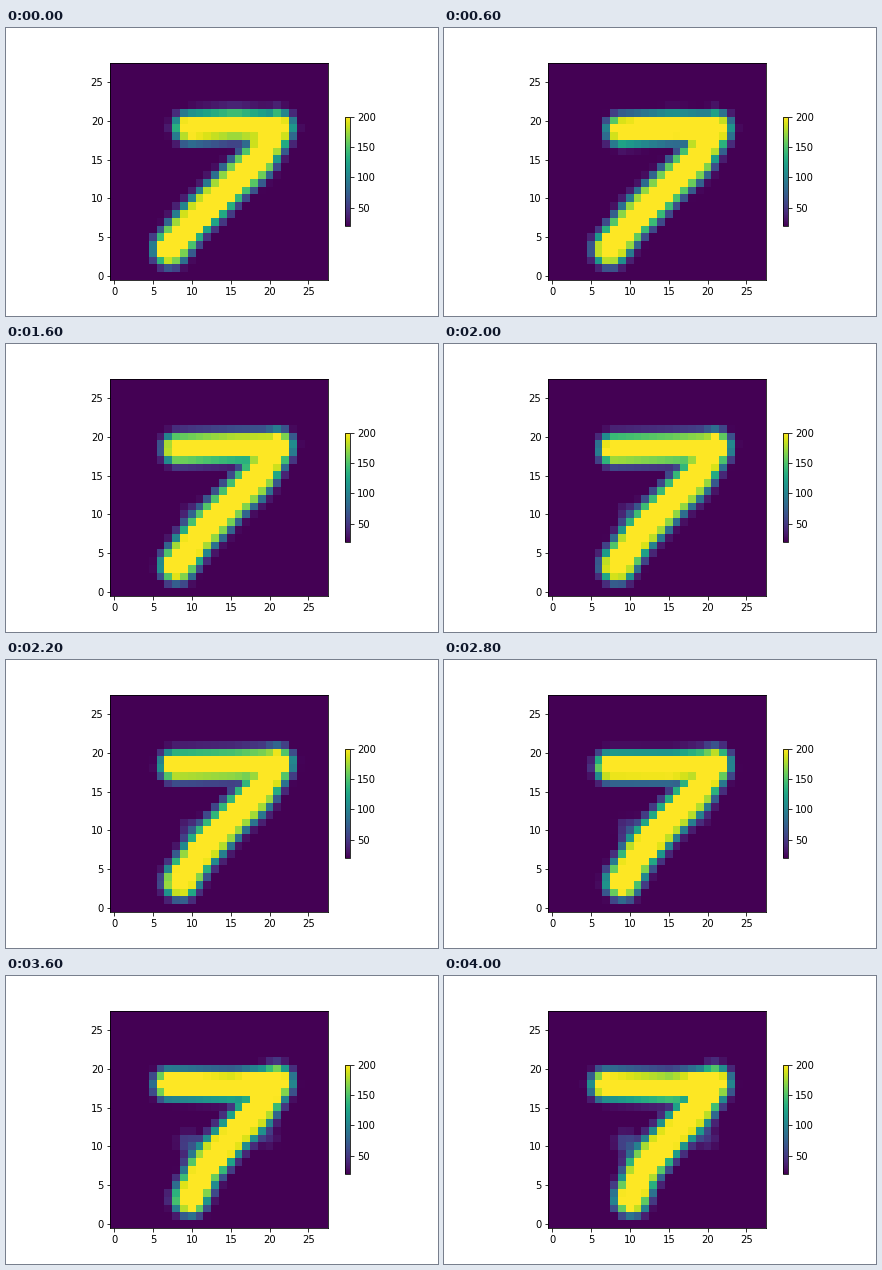
Animation of 432 by 288 pixels, one loop 4200 ms. Source, as a matplotlib script:

```python
import numpy as np
import matplotlib.pyplot as plt
from matplotlib.animation import FuncAnimation

FRAMES, INTERVAL = 21, 200
SIZE = 28
X, Y = np.meshgrid(np.arange(SIZE), np.arange(SIZE))

plt.rcParams.update({"font.family": "DejaVu Sans", "font.size": 10})


def move(start, end, progress, power=1):
    """Point on the way from start to end; power > 1 starts slowly."""
    return np.array(start) + np.subtract(end, start) * progress ** power


def segment_distance(a, b):
    dx, dy = b - a
    along = ((X - a[0]) * dx + (Y - a[1]) * dy) / (dx * dx + dy * dy)
    along = np.clip(along, 0, 1)
    return np.hypot(X - a[0] - along * dx, Y - a[1] - along * dy)


def stroke(points, radius, softness=0.5):
    distance = np.min([segment_distance(a, b)
                       for a, b in zip(points, points[1:])], axis=0)
    return 255 / (1 + np.exp((distance - radius) / softness))


def glow(x, y, width):
    return np.exp(-((X - x) ** 2 + (Y - y) ** 2) / width ** 2)


def digit(frame):
    u = frame / (FRAMES - 1)
    corner = move((20.9, 19.1), (20.8, 18.2), u)
    bar = [
        move((9.7, 19.1), (6.9, 17.9), u, 0.7),
        move((15.5, 19.4), (15.5, 17.6), u),
        corner,
    ]
    stem = [
        corner,
        move((18.6, 15), (18.8, 15), u),
        move((13.2, 10), (14.1, 10), u),
        move((10.1, 7), (11.7, 7), u),
        move((7.2, 3.5), (10.2, 3.3), u, 1.3),
    ]
    ink = np.maximum(stroke(bar, 1.75), stroke(stem, 2.0))
    return ink + 60 * u * glow(9.4, 10.6, 1.7) + 40 * u ** 2 * glow(20.2, 10.8, 1.7)


fig, ax = plt.subplots(figsize=(6, 4), dpi=72, facecolor="white")
fig.subplots_adjust(left=0.125, right=0.9, bottom=0.125, top=0.88)
image = ax.imshow(digit(0), cmap="viridis", vmin=20, vmax=200,
                  origin="lower", interpolation="nearest")
ax.set_xticks(range(0, SIZE, 5))
ax.set_yticks(range(0, SIZE, 5))
fig.colorbar(image, shrink=0.5, ticks=range(50, 201, 50))


def update(frame):
    image.set_data(digit(frame))
    return [image]


animation = FuncAnimation(fig, update, frames=FRAMES, interval=INTERVAL,
                          repeat=True, repeat_delay=0)
plt.show()
```
